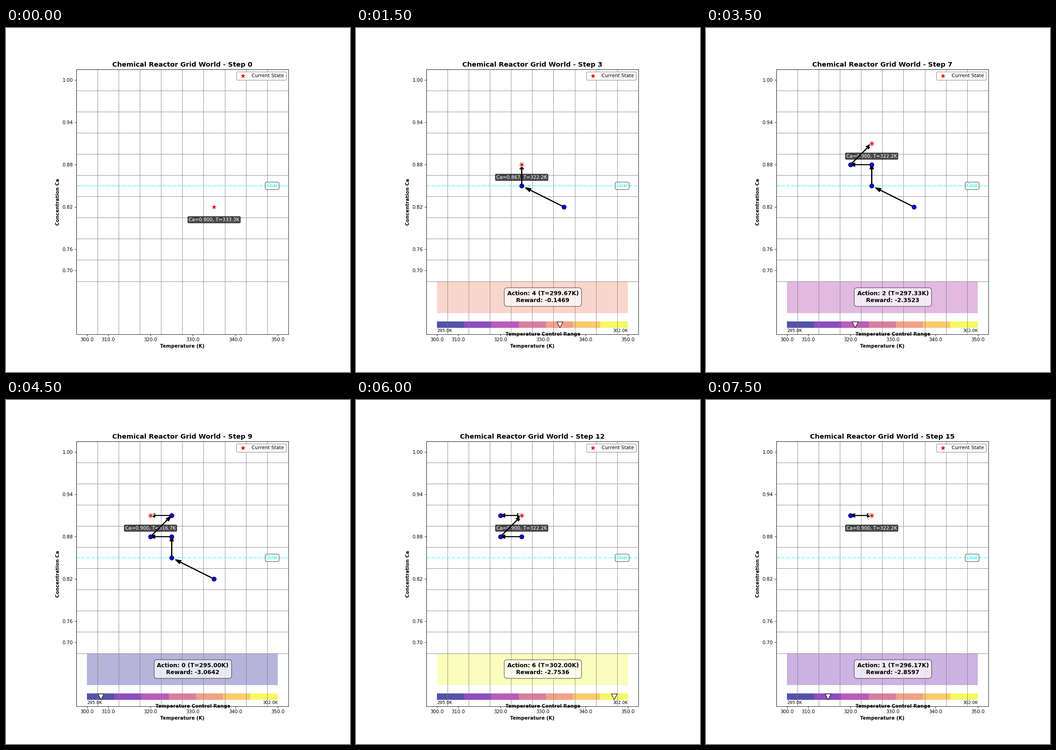
Recreate the animation shown at these times as a matplotlib script. Size 748x748 px, loop 8000 ms.

```python
import matplotlib.pyplot as plt
import numpy as np
from matplotlib.animation import FuncAnimation
from matplotlib.patches import Rectangle

plt.rcParams["font.family"] = "DejaVu Sans"

CELLS = 10
N_ACTIONS = 7
WINDOW = 10
BAR_W = (CELLS - 1) / N_ACTIONS

# Grid cell (temperature, concentration) after each step
PATH = [(6, 3), (4, 4), (4, 4), (4, 5), (3, 5), (4, 6), (4, 6), (4, 6),
        (4, 6), (3, 6), (4, 6), (4, 6), (4, 6), (4, 6), (4, 6), (4, 6)]
ACTIONS = [None, 6, 4, 4, 1, 4, 2, 2, 1, 0, 4, 4, 6, 4, 1, 1]
REWARDS = [0, -0.2412, -0.0021, -0.1469, -0.6803, -1.4404, -1.9721, -2.3523,
           -2.6618, -3.0642, -3.3269, -3.2405, -2.7536, -2.3530, -2.5714, -2.8597]

plasma = plt.get_cmap("plasma")
colors = [plasma(i / (N_ACTIONS - 1)) for i in range(N_ACTIONS)]

fig, ax = plt.subplots(figsize=(10, 10), dpi=74.8)
ax.set_xlim(-0.5, CELLS - 0.5)
ax.set_ylim(-3, CELLS - 0.5)
ax.set_aspect("equal")

ticks = [0, 1, 3, 5, 7, 9]
ax.set_xticks(ticks, ["300.0", "310.0", "320.0", "330.0", "340.0", "350.0"])
ax.set_yticks(ticks, ["0.70", "0.76", "0.82", "0.88", "0.94", "1.00"])
edges = np.arange(-0.5, CELLS, 1)
ax.set_xticks(edges, minor=True)
ax.set_yticks(edges, minor=True)
ax.grid(which="minor", color="gray", linewidth=0.8)
ax.tick_params(which="minor", length=0)
ax.set_xlabel("Temperature (K)", fontweight="bold")
ax.set_ylabel("Concentration Ca", fontweight="bold")
title = ax.set_title("", fontsize=14, fontweight="bold")

ax.axhline(4, color="cyan", linestyle="--", linewidth=2, alpha=0.5)
ax.text(9, 4, "Goal", color="cyan", ha="right", va="center",
        bbox=dict(boxstyle="round,pad=0.3", facecolor="white", alpha=0.7))

star = ax.scatter([], [], marker="*", s=250, c="red", edgecolors="white",
                  linewidths=1.5, zorder=7, label="Current State")
ax.legend(loc="upper right", framealpha=0.9, edgecolor="gray")

layer = []


def add(artist):
    layer.append(artist)
    return artist


def draw_state(x, y):
    star.set_offsets([(x, y)])
    ca = 0.7 + 0.3 * y / (CELLS - 1)
    temp = 300 + 50 * x / (CELLS - 1)
    add(ax.text(x, y - 0.6, f"Ca={ca:.3f}, T={temp:.1f}K", color="white",
                ha="center", va="center",
                bbox=dict(boxstyle="round,pad=0.2", facecolor="black", alpha=0.7)))


def draw_trail(points):
    for (x0, y0), (x1, y1) in zip(points, points[1:]):
        if (x0, y0) != (x1, y1):
            add(ax.arrow(x0, y0, 0.8 * (x1 - x0), 0.8 * (y1 - y0),
                         head_width=0.15, head_length=0.25, linewidth=2,
                         fc="black", ec="black", zorder=4))
    xs, ys = zip(*sorted(set(points)))
    add(ax.scatter(xs, ys, s=80, c="blue", edgecolors="black", linewidths=1, zorder=6))


def draw_action(action, reward):
    temp = 295 + 7 * action / (N_ACTIONS - 1)
    add(ax.add_patch(Rectangle((0, -2), 9, 1.5, facecolor=colors[action],
                               edgecolor="none", alpha=0.3)))
    add(ax.text(5, -1.25, f"Action: {action} (T={temp:.2f}K)\nReward: {reward:.4f}",
                fontsize=12, fontweight="bold", ha="center", va="center",
                bbox=dict(boxstyle="round,pad=0.5", facecolor="white", alpha=0.7)))
    for i, color in enumerate(colors):
        add(ax.add_patch(Rectangle((i * BAR_W, -2.7), BAR_W, 0.3, facecolor=color,
                                   edgecolor="none", alpha=0.7)))
    add(ax.scatter([(action + 0.5) * BAR_W], [-2.55], marker="v", s=150, c="white",
                   edgecolors="black", linewidths=1, zorder=5))
    add(ax.text(0, -2.85, "295.0K", fontsize=9, ha="left", va="center"))
    add(ax.text(9, -2.85, "302.0K", fontsize=9, ha="right", va="center"))
    add(ax.text(5, -3, "Temperature Control Range", fontweight="bold",
                ha="center", va="center"))


def update(step):
    while layer:
        layer.pop().remove()
    title.set_text(f"Chemical Reactor Grid World - Step {step}")
    draw_state(*PATH[step])
    if step > 0:
        draw_trail(PATH[max(0, step + 1 - WINDOW):step + 1])
        draw_action(ACTIONS[step], REWARDS[step])
    return []


anim = FuncAnimation(fig, update, frames=len(PATH), interval=500,
                     repeat=True, repeat_delay=0, blit=False)
plt.show()
```
